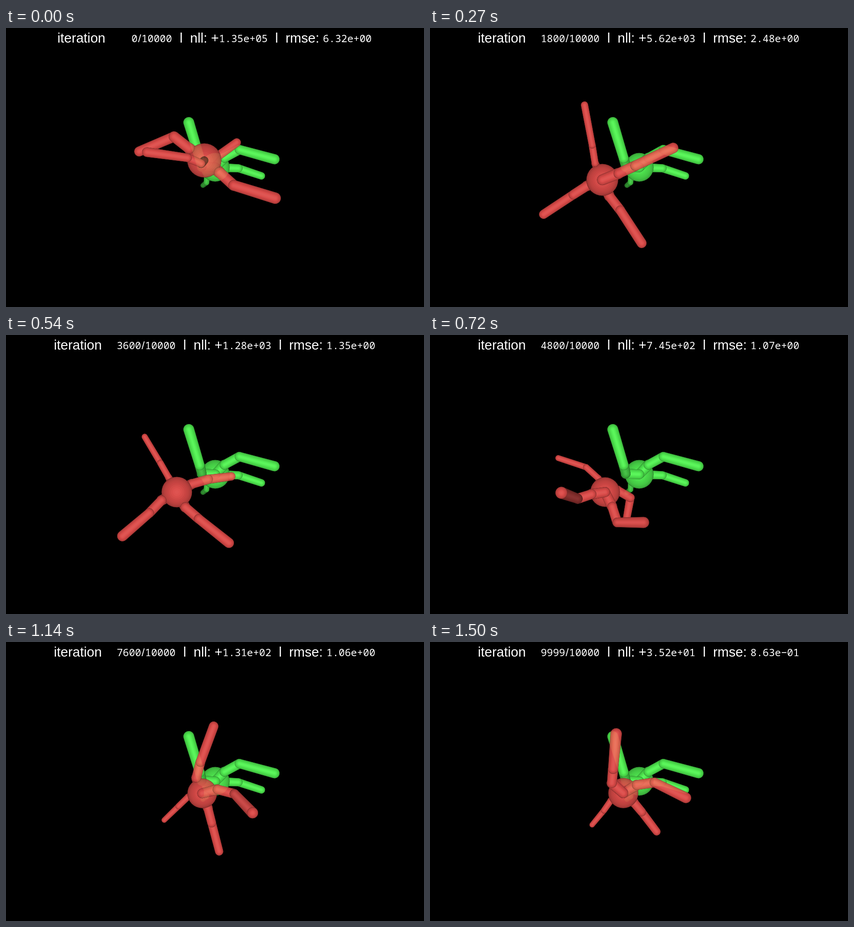
Write an HTML page with a canvas that moves like this. It is 917 by 611 pixels and loops after 2.53 s.

```html
<!DOCTYPE html>
<html lang="en">
<head>
<meta charset="utf-8">
<title>Pose fitting</title>
<style>
  html, body { margin: 0; width: 100%; height: 100%; overflow: hidden; background: #000; }
  canvas, svg { position: absolute; left: 0; top: 0; width: 917px; height: 611px; }
  text { fill: #fff; font: 29.6px "Liberation Sans", Arial, sans-serif; }
  .num { font: 22.3px "Noto Sans Mono", "DejaVu Sans Mono", monospace; }
  .slash { font-size: 24px; }
</style>
</head>
<body>
<canvas id="stage" width="917" height="611"></canvas>
<svg viewBox="0 0 917 611">
  <text id="word" x="105" y="32">iteration</text>
  <g id="rest">
    <text id="count" class="num" x="296.5" y="31" text-anchor="end"></text>
    <text class="slash" x="297.5" y="31">/</text>
    <text class="num" x="305" y="31">10000</text>
    <text x="388.7" y="32">l</text>
    <text x="411.5" y="32">nll:</text>
    <text x="457.5" y="32">+</text>
    <text id="nll" class="num" x="475" y="31"></text>
    <text x="598.4" y="32">l</text>
    <text x="621" y="32">rmse:</text>
    <text id="rmse" class="num" x="703" y="31"></text>
  </g>
</svg>
<script>
const W = 917, H = 611, LOOP = 2530, STEP = 30, LAST = 50;
const RED = [255, 88, 85], GREEN = [80, 235, 80], RED_ALPHA = 0.87;

// Lengths in units of one hip bone, the others in torso radii
const BONE = 1.13, SHIN = 2.1, CAMERA = 13, THICK = 0.31, SLIM = 0.7;
const SLIM_LEG = 2;

const $ = id => document.getElementById(id);
const clamp = v => Math.max(0, Math.min(1, v));
const mix = (a, b, u) => a + (b - a) * u;
const blend = (a, b, u) => a.map((v, i) => mix(v, b[i], u));
const rad = deg => deg * Math.PI / 180;

// Vectors: x right, y down, z toward the viewer
const add = (a, b, k = 1) => a.map((v, i) => v + b[i] * k);
const turnTo = (a, b, angle) => a.map((v, i) => v * Math.cos(angle) + b[i] * Math.sin(angle));

// torso: x, y, radius; turn: heading, tilt, roll; hips and ankles: one angle per leg
const goal = { torso: [459, 305, 31.5], turn: [-46, 40, -54], hips: [30, 0, -30, 52], ankles: [46, 16, -20, -30] };
const poses = [
  { step: 0, nll: 1.35e5, rmse: 6.32, torso: [435, 290, 37.5],
    turn: [-45, -78, 7], hips: [20, 20, 38, 0], ankles: [46, 25, -12, -60] },
  { step: 5, nll: 1.58e4, rmse: 3.77, torso: [389, 321, 35.5],
    turn: [75, -12, -12], hips: [15, 5, 6, 6], ankles: [48, 5, 3, 0] },
  { step: 13, nll: 2.00e3, rmse: 1.63, torso: [367, 344, 34.5],
    turn: [58, 0, -24], hips: [-45, -26, 24, -12], ankles: [-20, 28, 8, -10] },
  { step: 24, nll: 745, rmse: 1.07, torso: [384, 344, 32.5],
    turn: [64, 20, 42], hips: [10, -8, -30, 42], ankles: [65, 40, -30, -62] },
  { step: 32, nll: 240, rmse: 1.03, torso: [419, 320, 32],
    turn: [0, 20, 5], hips: [22, 5, -25, 35], ankles: [54, 3, -8, -55] },
  { step: 43, nll: 78.9, rmse: 1.09, torso: [440, 341, 33],
    turn: [-26, 29, -33], hips: [35, 8, -27, 38], ankles: [53, -3, -17, 6] },
  { step: 50, nll: 35.2, rmse: 0.863, torso: [424, 331, 33],
    turn: [-31, 27, -35], hips: [28, 8, -22, 46], ankles: [46, 5, -8, 2] }
];

// Two axes of the torso plane and its normal
function axes([heading, tilt, roll]) {
  const [h, t, r] = [heading, tilt, roll].map(rad);
  const side = [-Math.sin(h), Math.cos(h), 0];
  const up = [-Math.sin(t) * Math.cos(h), -Math.sin(t) * Math.sin(h), Math.cos(t)];
  return {
    front: [Math.cos(t) * Math.cos(h), Math.cos(t) * Math.sin(h), Math.sin(t)],
    right: turnTo(side, up, r),
    normal: turnTo(up, side, -r)
  };
}

// Outline around two circles of different size
function hull(c, a, b, grow) {
  const d = Math.hypot(b.x - a.x, b.y - a.y), ra = a.r * grow, rb = b.r * grow;
  c.beginPath();
  if (d <= Math.abs(ra - rb) + 0.01) {
    const big = ra > rb ? a : b;
    c.arc(big.x, big.y, Math.max(ra, rb), 0, 7);
  } else {
    const dir = Math.atan2(b.y - a.y, b.x - a.x), open = Math.acos((ra - rb) / d);
    c.arc(a.x, a.y, ra, dir + open, dir - open + 2 * Math.PI);
    c.arc(b.x, b.y, rb, dir - open, dir + open);
  }
  c.fill();
}

// Rounded solid: nested hulls, lighter toward the axis
function solid(c, a, b, color, shade = 1) {
  const n = 12;
  for (let i = 0; i < n; i++) {
    const angle = i / n * Math.PI / 2;
    const light = shade * (i ? 0.58 + 0.42 * Math.sin(angle) ** 0.7 : 0.32);
    const gloss = shade * Math.max(0, i - 7) * 3;
    c.fillStyle = `rgb(${color.map(v => Math.min(255, v * light + gloss)).join()})`;
    hull(c, a, b, Math.cos(angle));
  }
}

function drawBody(c, body, color) {
  const [cx, cy, radius] = body.torso, unit = radius * BONE;
  const { front, right, normal } = axes(body.turn);
  const core = { x: cx, y: cy, r: radius };
  const parts = [{ depth: 0, draw: () => solid(c, core, core, color, 0.97) }];

  const project = ([x, y, z], thick) => {
    const scale = CAMERA / (CAMERA - z);
    return { x: cx + x * unit * scale, y: cy + y * unit * scale, r: radius * thick * scale };
  };
  const bone = (from, dir, length, thick, depth) => {
    const to = add(from, dir, length);
    const a = project(from, thick), b = project(to, thick);
    const shade = 1 - 0.45 * clamp((Math.abs(dir[2]) - 0.8) / 0.18);
    parts.push({
      depth: depth ?? (from[2] + to[2]) / 2 + length * 0.08,
      draw() {
        solid(c, a, b, color, shade);
        if (shade < 0.9 && length === SHIN && dir[2] > 0) solid(c, b, b, color);
      }
    });
    return to;
  };

  for (let i = 0; i < 4; i++) {
    const angle = i * Math.PI / 2, thick = THICK * (i === SLIM_LEG ? SLIM : 1);
    const socket = turnTo(front, right, angle);
    const thigh = turnTo(front, right, angle + rad(body.hips[i]));
    const shin = turnTo(thigh, normal, rad(body.ankles[i]));
    const hip = bone([0, 0, 0], socket, 1, thick * 1.08, socket[2] > 0.25 ? 0.01 : -1);
    const knee = bone(hip, thigh, 1, thick);
    bone(knee, shin, SHIN, thick * 0.97);
  }
  parts.sort((a, b) => a.depth - b.depth).forEach(p => p.draw());
}

function layer() {
  const el = document.createElement("canvas");
  el.width = W;
  el.height = H;
  return el;
}

function bodyAt(step) {
  const i = Math.max(1, poses.findIndex(p => p.step >= step));
  const a = poses[i - 1], b = poses[i];
  const u = (step - a.step) / (b.step - a.step);
  const body = {};
  for (const key of ["torso", "turn", "hips", "ankles"]) body[key] = blend(a[key], b[key], u);
  for (const key of ["nll", "rmse"]) body[key] = a[key] * (b[key] / a[key]) ** u;
  return body;
}

const sci = v => v.toExponential(2)
  .replace(/e([+-])(\d)$/, "e$10$2").replace("-", "\u2212");

const ctx = $("stage").getContext("2d");
const still = layer(), moving = layer(), pen = moving.getContext("2d");
drawBody(still.getContext("2d"), goal, GREEN);

function render(ms) {
  const step = Math.min(LAST, Math.floor(ms / STEP));
  const body = bodyAt(step);
  pen.clearRect(0, 0, W, H);
  drawBody(pen, body, RED);
  ctx.globalAlpha = 1;
  ctx.fillStyle = "#000";
  ctx.fillRect(0, 0, W, H);
  ctx.drawImage(still, 0, 0);
  ctx.globalAlpha = RED_ALPHA;
  ctx.drawImage(moving, 0, 0);

  const count = String(Math.min(9999, step * 200));
  const shift = (4 - count.length) * 2.6;
  $("word").setAttribute("x", 105 + shift);
  $("rest").setAttribute("transform", `translate(${-shift} 0)`);
  $("count").textContent = count;
  $("nll").textContent = sci(body.nll);
  $("rmse").textContent = sci(body.rmse);
}

function tick() {
  render(performance.now() % LOOP);
  requestAnimationFrame(tick);
}
tick();
</script>
</body>
</html>
```
